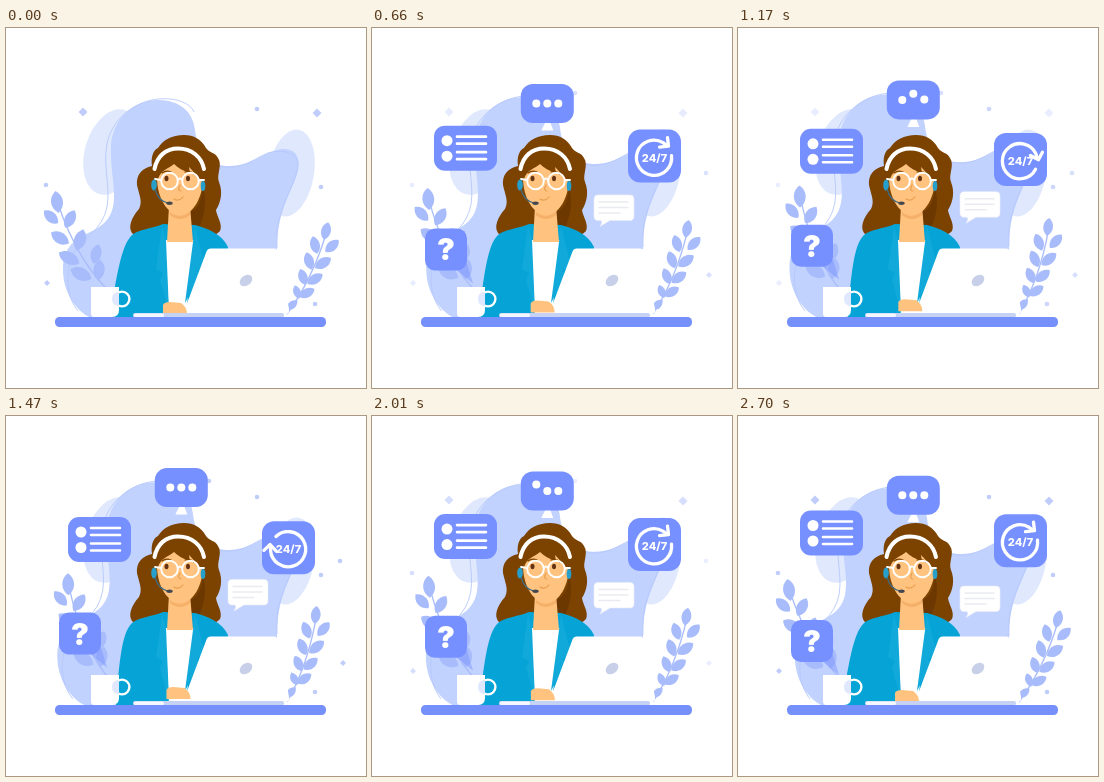
Write an HTML page that moves like this. It is 360 px wide and 360 px high and loops after 2.73 s.

```html
<!DOCTYPE html>
<html lang="en">
<head>
<meta charset="utf-8">
<title>Support desk</title>
<style>
html, body { margin: 0; width: 100%; height: 100%; overflow: hidden; background: #fff; }
svg { display: block; width: 100vw; height: 100vh; }
text { font-family: Inter, Roboto, sans-serif; font-weight: 800; fill: #fff; text-anchor: middle; }
.card { fill: #7790ff; }
.w { fill: #fff; }
.wl { fill: none; stroke: #fff; stroke-linecap: round; stroke-linejoin: round; }
.hair { fill: #7c4300; }
.skin { fill: #ffc37f; }
.leaf { fill: #a8bcfb; }
.stem { fill: none; stroke: #a8bcfb; stroke-width: 1.3; }
.spark { fill: #c0cdfb; }
</style>
</head>
<body>
<svg viewBox="0 0 360 360">
  <g fill="#dfe8fd">
    <ellipse cx="106" cy="124" rx="27" ry="44" transform="rotate(17 106 124)"/>
    <ellipse cx="285" cy="145" rx="23" ry="44" transform="rotate(10 285 145)"/>
  </g>
  <g id="blob">
    <path fill="#c1d2ff" d="M85 290C68 282 57 262 57 242C57 222 66 213 80 206C98 198 108 190 108 168C108 150 104 138 105 117C107 92 126 72 152 72C174 72 187 84 189 102C191 122 201 137 221 138C247 139 258 122 278 121C293 121 296 135 289 152C281 172 271 188 271 222L271 290Z"/>
    <path fill="none" stroke="#b7c9fb" stroke-width=".9" d="M72 283C60 268 60 248 65 231C69 216 92 206 99 186C107 165 96 140 101 116C106 91 127 76 146 72C166 68 184 74 188 84M214 138C235 143 247 131 262 125C276 121 289 124 292 134C293 148 280 166 274 188C270 203 271 210 271 220"/>
  </g>
  <g id="sparks"></g>
  <g id="plantL"><path class="stem" d="M104 264Q72 234 52 176"/></g>
  <g id="plantR"><path class="stem" d="M281 286Q306 252 320 206"/></g>

  <g id="woman">
    <path class="hair" d="M178 107C166 107 157 112 152 120C146 123 145 131 146 138C136 140 130 147 131 157C133 167 137 173 133 181C125 190 122 199 126 205C133 212 146 210 155 207L190 207C198 211 209 209 214 203C217 196 211 189 210 182C215 174 217 164 213 154C210 147 217 137 212 130C209 124 203 125 200 120C195 111 188 107 178 107Z"/>
    <path fill="#6c3800" d="M184 184C193 181 196 171 197 160C202 176 197 194 190 205L185 207Z"/>
    <path id="jacket" fill="#06a4d6"/>
    <path class="w" d="M159 212L188 212L180 286L163 286Z"/>
    <path class="skin" d="M163 178L184 178L187 214L161 214Z"/>
    <path fill="#f5b069" d="M164 184Q174 192 184 183L184 187Q174 195 164 187Z"/>
    <path fill="#10a9da" d="M156 198L160 212L163 284L154 252L157 245L150 241Z"/>
    <path fill="#10a9da" d="M189 198L187 214L179 275L194 247L190 243L199 238Z"/>
    <path class="skin" d="M151 149C150 134 160 132 174 132C190 132 197 138 197 150C197 169 187 187 175 187C162 187 151 171 151 149Z"/>
    <path class="hair" d="M148 158C145 139 153 123 174 121C193 121 203 139 199 158L195 152C190 147 187 143 183 139L184 145C177 143 172 140 168 136C162 141 155 142 152 151Z"/>
    <path class="wl" stroke-width="4" d="M148.500 141C151 128 160 120.500 172 120.500C186 120.500 195.500 129 198 141"/>
    <ellipse cx="160.500" cy="150.500" rx="2" ry="2.800" fill="#643214"/>
    <ellipse cx="182" cy="150.500" rx="2" ry="2.800" fill="#643214"/>
    <path fill="none" stroke="#7c4300" stroke-width="1.200" stroke-linecap="round" d="M156 145Q160 142 165 144M179 144Q184 142 188 146"/>
    <g class="wl" stroke-width="1.900">
      <circle cx="163.500" cy="153" r="8.300"/><circle cx="184.500" cy="153" r="8.300"/>
      <path d="M171.800 152Q174 149 176.200 152M155.200 152L149 151M192.800 152L198 152"/>
    </g>
    <path fill="none" stroke="#e79d50" stroke-width="1.200" stroke-linecap="round" d="M174 157Q171 163 175 163M168 171Q173 174 177 169"/>
    <ellipse cx="148" cy="157" rx="2.800" ry="5.500" fill="#279fcb"/>
    <ellipse cx="197" cy="158" rx="2.300" ry="5" fill="#279fcb"/>
    <path fill="none" stroke="#3e6d85" stroke-width="1.200" d="M149 161Q152 173 162 175"/>
    <ellipse cx="163.500" cy="175.300" rx="3.200" ry="1.700" fill="#43484f"/>
  </g>

  <path class="w" d="M205 220.500H268Q271.500 220.500 272.500 225L283 281Q284 286 279 286H177L200.500 223.500Q201.500 220.500 205 220.500Z"/>
  <ellipse cx="240" cy="252.500" rx="7" ry="5" transform="rotate(-38 240 252.500)" fill="#c7d0e8"/>
  <path id="hand" class="skin" d="M157 286V277Q158 274 164 274L175 275Q181 279 181 286Z"/>
  <rect x="127" y="285" width="151" height="4.500" rx="2" fill="#c5d2f4"/>
  <rect x="128" y="285.500" width="30" height="3.500" rx="1.500" fill="#f4f7ff"/>

  <circle class="wl" cx="116" cy="271" r="7.400" stroke-width="2.400"/>
  <path class="w" d="M85 259H113V282Q113 289 106 289H88Q85 289 85 285Z"/>
  <path fill="#dfe8ff" d="M113 264Q106 264 106 271Q106 278 113 278Z"/>
  <rect x="49" y="289" width="271" height="10" rx="4.500" fill="#758ffb"/>

  <g id="chat">
    <path fill="#fff" stroke="#eceef5" stroke-width=".6" d="M-16 -13H16Q20 -13 20 -9V8Q20 12.500 16 12.500H-4L-14 18.500Q-11 15 -13 12.500H-16Q-20 12.500 -20 8V-9Q-20 -13 -16 -13Z"/>
    <path stroke="#e9ebf1" stroke-width="1.500" stroke-linecap="round" d="M-15 -6H14M-15 -.5H14M-15 5H6"/>
  </g>
  <g id="clock">
    <rect class="card" x="-26.500" y="-26.500" width="53" height="53" rx="12"/>
    <g id="ring">
      <path class="wl" stroke-width="3.300" d="M17.500 -2A17.600 17.600 0 1 1 9 -15L13 -12"/>
      <path class="wl" stroke-width="3.300" d="M13.500 -20L14.500 -11.500L5.500 -10.500"/>
    </g>
    <text y="5.500" font-size="11">24/7</text>
  </g>
  <g id="list">
    <rect class="card" x="-31.500" y="-22.500" width="63" height="45" rx="11"/>
    <circle class="w" cx="-18.500" cy="-7.500" r="5.500"/>
    <circle class="w" cx="-18.500" cy="8" r="5.500"/>
    <path class="wl" stroke-width="2.600" d="M-8.500 -11.500H20.500M-8.500 -4.500H20.500M-8.500 4H20.500M-8.500 11H20.500"/>
  </g>
  <g id="dots">
    <path class="w" d="M-6 27L-2 19H3L6 27Z"/>
    <rect class="card" x="-26.500" y="-19.500" width="53" height="39" rx="12"/>
    <circle class="w" cx="-11" r="4"/><circle class="w" r="4"/><circle class="w" cx="11" r="4"/>
  </g>
  <g id="ask">
    <path class="card" opacity=".45" d="M10 20L27 34L21 14Z"/>
    <rect class="card" x="-21" y="-21" width="42" height="42" rx="10"/>
    <text y="11" font-size="30" style="font-weight:900">?</text>
  </g>
</svg>
<script>
const LOOP = 2730, STEP = 30, TAU = Math.PI * 2;
const $ = id => document.getElementById(id);
const clamp = v => Math.min(1, Math.max(0, v));
const ease = p => { p = clamp(p); return p * p * (3 - 2 * p); };
const move = (id, transform) => $(id).setAttribute('transform', transform);

function add(parent, d, cls, transform) {
  const el = document.createElementNS('http://www.w3.org/2000/svg', 'path');
  el.setAttribute('d', d);
  el.setAttribute('class', cls);
  el.setAttribute('transform', transform);
  parent.appendChild(el);
  return el;
}

// centre x, centre y, tilt, length
function leaves(id, list) {
  for (const [x, y, tilt, len] of list) {
    const h = len / 2, w = len * .36;
    add($(id), `M0 ${-h}C${w} ${-h * .5} ${w} ${h * .5} 0 ${h}C${-w} ${h * .5} ${-w} ${-h * .5} 0 ${-h}Z`,
      'leaf', `translate(${x} ${y}) rotate(${tilt})`);
  }
}
leaves('plantL', [[51, 174, -8, 22], [45, 189, -48, 19], [64, 191, 28, 20], [54, 210, -58, 21],
  [74, 212, 18, 22], [63, 230, -62, 23], [90, 226, 14, 20], [75, 246, -65, 23], [93, 242, 5, 21]]);
leaves('plantR', [[320, 203, 14, 18], [309, 217, -14, 18], [326, 218, 48, 18], [303, 233, -16, 18],
  [317, 235, 58, 19], [297, 249, -18, 17], [309, 251, 58, 18], [291, 264, -18, 14], [301, 265, 62, 17], [286, 277, 50, 14]]);

const diamond = 'M0 -4.500L4.500 0L0 4.500L-4.500 0Z';
const dot = 'M-2.300 0A2.300 2.300 0 1 1 2.300 0A2.300 2.300 0 1 1 -2.300 0Z';
const small = 'M0 -3L3 0L0 3L-3 0Z';
const glow = [
  t => clamp(.5 + .65 * Math.cos(TAU * t / 910)),
  t => clamp(.5 - .65 * Math.cos(TAU * t / 910)),
  t => clamp(.2 + Math.cos(TAU * t / 1365))
];
const sparks = [
  [77, 84, diamond, 0], [311, 85, diamond, 0], [40, 157, dot, 0], [41, 255, small, 0],
  [334, 145, dot, 1], [337, 247, small, 1], [203, 65, dot, 1],
  [251, 81, dot, 2], [315, 159, dot, 2], [309, 276, dot, 2]
].map(([x, y, d, set]) => ({ el: add($('sparks'), d, 'spark', `translate(${x} ${y})`), set }));

// centre, float height, pop start, corner the pop grows from
const cards = [
  ['chat', 242, 179.7, 3.4, 60, -14, 18],
  ['clock', 282.5, 128.3, -3.6, 110, -26.5, 26.5],
  ['list', 93.5, 120.3, -3.3, 160, 31.5, 22.5],
  ['dots', 175.3, 75.4, 3.9, 185, 0, 19.5],
  ['ask', 74, 221.2, 3.8, 210, 21, -21]
];
const balls = $('dots').querySelectorAll('circle');

function hop(t, i) {
  const p = ((t - 850 - i * 150) % 1040 + 1040) % 1040 / 280;
  return p < 1 ? -7 * Math.sin(Math.PI * p) ** 2 : 0;
}

function draw(t) {
  const c = Math.cos(TAU * t / LOOP), swing = (1 - c) / 2;
  for (const [id, x, y, amp, start, ax, ay] of cards) {
    const s = ease((t - start) / 400);
    $(id).setAttribute('visibility', s > 0 ? 'visible' : 'hidden');
    move(id, `translate(${x + ax * (1 - s)} ${y + amp * c + ay * (1 - s)}) scale(${s})`);
  }
  balls.forEach((b, i) => b.setAttribute('cy', hop(t, i)));
  move('ring', `translate(-.5 1.500) rotate(${360 * ease((t - 1030) / 733)})`);
  move('blob', `translate(271 290) scale(${1 + .027 * swing}) translate(-271 -290)`);
  move('plantL', `rotate(${7 * swing} 104 264)`);
  move('plantR', `rotate(${-7 * swing} 281 286)`);
  move('hand', `translate(${3.5 * swing} ${-3 * swing})`);
  const e = 6 * swing;
  $('jacket').setAttribute('d', `M157 196C145 201 133 201 126 207C115 217 ${110 + e / 2} 252 ${104 + e} 289H163L160 212H187L179 277L218 246L222 219C216 206 203 201 189 197Z`);
  for (const s of sparks) s.el.setAttribute('opacity', glow[s.set](t));
}

let origin = null;
function tick(now) {
  if (origin === null) origin = now;
  draw(Math.floor((now - origin) % LOOP / STEP) * STEP);
  requestAnimationFrame(tick);
}
draw(0);
requestAnimationFrame(tick);
</script>
</body>
</html>
```
